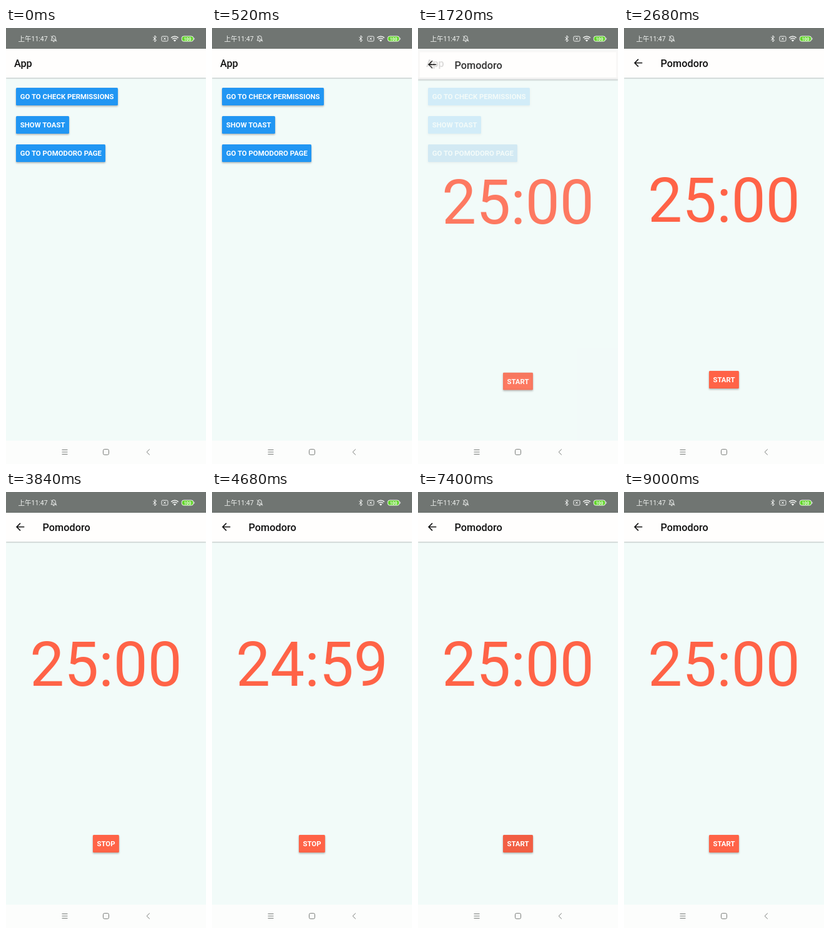
An HTML page for the animation above (9040 ms loop, 320x693 px).

```html
<!DOCTYPE html>
<html lang="zh">
<head>
<meta charset="utf-8">
<title>Pomodoro</title>
<style>
  html, body { margin: 0; width: 100%; height: 100%; overflow: hidden; background: #fcfdfc; }
  #stage { position: relative; width: 320px; height: 693px; overflow: hidden; font-family: Roboto, sans-serif; }
  #stage > svg { position: absolute; left: 0; top: 0; }
  #content { position: absolute; top: 33px; width: 320px; height: 623px; overflow: hidden; }
  .page { position: absolute; inset: 0; background: #f2fbf9; }
  .header {
    position: absolute; width: 320px; height: 45.5px; background: #fffefd;
    box-shadow: 0 1px 2px rgba(0, 0, 0, .25);
  }
  .title { position: absolute; top: 0; font: 500 16.3px/47px Roboto, sans-serif; color: #111; }
  .button {
    position: absolute; box-sizing: border-box; height: 28.5px; padding: 0 6.5px; border-radius: 1.6px;
    font: 700 11.4px/28.5px Roboto, sans-serif; white-space: nowrap;
    color: rgba(255, 255, 255, calc(1 - var(--ghost, 0)));
    background-image: radial-gradient(circle, rgba(0, 0, 0, var(--shade, 0)) var(--radius, 0px), transparent calc(var(--radius, 0px) + 1px));
    box-shadow: 0 1.5px 3px rgba(0, 0, 0, .3);
  }
  #home .button { left: 16.3px; background-color: #2196f3; }
  #toggle { left: 160px; top: 511.5px; transform: translateX(-50%); background-color: #ff6347; }
  #clock {
    position: absolute; top: 192px; width: 320px; text-align: center;
    font: 400 97.8px/100px Roboto, sans-serif; color: #ff6347;
  }
  /* Elevation shadows showing through half-transparent surfaces */
  .ghost::after {
    content: ""; position: absolute; inset: 0; border: 3px solid #000; opacity: var(--ghost);
  }
  .button.ghost::after { border-top-width: 8px; opacity: calc(var(--ghost) * .7); }
  #back { position: absolute; left: 15px; top: 15px; }
</style>
</head>
<body>
<div id="stage">
  <div id="content">
    <div class="page" id="home">
      <div class="header"><span class="title" style="left:13px">App</span></div>
      <div class="button" style="top:61.5px">GO TO CHECK PERMISSIONS</div>
      <div class="button" style="top:106.5px">SHOW TOAST</div>
      <div class="button" style="top:151.5px" id="open">GO TO POMODORO PAGE</div>
    </div>
    <div class="page" id="pomodoro">
      <div class="header ghost">
        <svg id="back" width="16" height="16" fill="none" stroke="#111" stroke-width="1.6">
          <path d="M14.3 7.5H2.5M8 1.6 2.1 7.5 8 13.4"/>
        </svg>
        <span class="title" style="left:58.5px">Pomodoro</span>
      </div>
      <div id="clock">25:00</div>
      <div class="button ghost" id="toggle">START</div>
    </div>
  </div>
  <svg width="320" height="33" fill="none" stroke="#f2f4f2" stroke-width="1">
    <rect width="320" height="33" fill="#707572" stroke="none"/>
    <text x="19.5" y="21" font-size="10.5" fill="#f2f4f2" stroke="none" font-family="Roboto, 'Noto Sans CJK SC', 'Noto Sans CJK', sans-serif">上午11:47</text>
    <path d="M72 19.8h8.5l-1.2-1.8v-2.5a3 3 0 0 0-6 0V18zM75 21.6h2.6M72 12.6l9 9"/>
    <path d="M235.3 14.5l5.4 5-2.7 2.5V12l2.7 2.5-5.4 5"/>
    <rect x="249" y="13.2" width="10" height="7.8" rx="1.6"/>
    <path d="M252.3 15.4l3.4 3.4m0-3.4l-3.4 3.4"/>
    <path d="M264.3 15.6a8.2 8.2 0 0 1 11.4 0M266.2 17.8a5.4 5.4 0 0 1 7.6 0" stroke-width="1.5"/>
    <path d="M267.8 19.5a3.2 3.2 0 0 1 4.4 0L270 21.8z" fill="#f2f4f2" stroke="none"/>
    <rect x="281.2" y="13" width="18.6" height="8.2" rx="3.2" fill="#62d52b"/>
    <path d="M301 15.6v3"/>
    <text x="290.5" y="19.5" font-size="6.6" font-weight="700" text-anchor="middle" fill="#fff" stroke="none" font-family="Roboto, sans-serif">100</text>
  </svg>
  <svg width="320" height="693" fill="none" stroke="#777b78" stroke-width="1">
    <rect y="656" width="320" height="37" fill="#fcfdfc" stroke="none"/>
    <path d="M89.5 670.5h9m-9 3.5h9m-9 3.5h9M229.8 669.5l-4.6 4.5 4.6 4.5"/>
    <rect x="155.5" y="669.7" width="9" height="8.6" rx="2"/>
  </svg>
</div>
<script>
  const LOOP = 9040, OPEN = 1563, SLIDE = 350, START = 3000, STOP = 7200;
  const [open, page, back, clock, toggle] =
    ["open", "pomodoro", "back", "clock", "toggle"].map(id => document.getElementById(id));
  const clamp = v => Math.min(1, Math.max(0, v));

  // Page opacity over the eased slide progress
  function fade(p) {
    if (p < .5) return p * .5;
    if (p < .9) return .25 + (p - .5) * 1.125;
    return .7 + (p - .9) * 3;
  }

  function ripple(button, age, speed) {
    const active = age >= 0 && age < 400;
    button.style.setProperty("--radius", (active ? 24 + age * speed : 0) + "px");
    button.style.setProperty("--shade", active ? .2 * (1 - age / 400) : 0);
  }

  function render(t) {
    const p = 1 - (1 - clamp((t - OPEN) / SLIDE)) ** 5;
    const alpha = fade(p);
    page.style.visibility = t < OPEN ? "hidden" : "visible";
    page.style.opacity = alpha;
    page.style.transform = `translateY(${52 * (1 - p)}px)`;
    page.style.setProperty("--ghost", clamp(1.4 * (1 - alpha) ** 2));
    back.style.opacity = p;

    const running = t >= START && t < STOP;
    const left = 1500 - (running ? Math.floor((t - START) / 1000) : 0);
    const pad = n => String(n).padStart(2, "0");
    clock.textContent = pad(Math.floor(left / 60)) + ":" + pad(left % 60);
    toggle.textContent = running ? "STOP" : "START";

    ripple(open, t - OPEN, .55);
    ripple(toggle, t < 5000 ? t - 2880 : t - STOP + 100, .1);
  }

  const begin = performance.now();
  function frame() {
    render((performance.now() - begin) % LOOP);
    requestAnimationFrame(frame);
  }
  render(0);
  requestAnimationFrame(frame);
</script>
</body>
</html>
```
